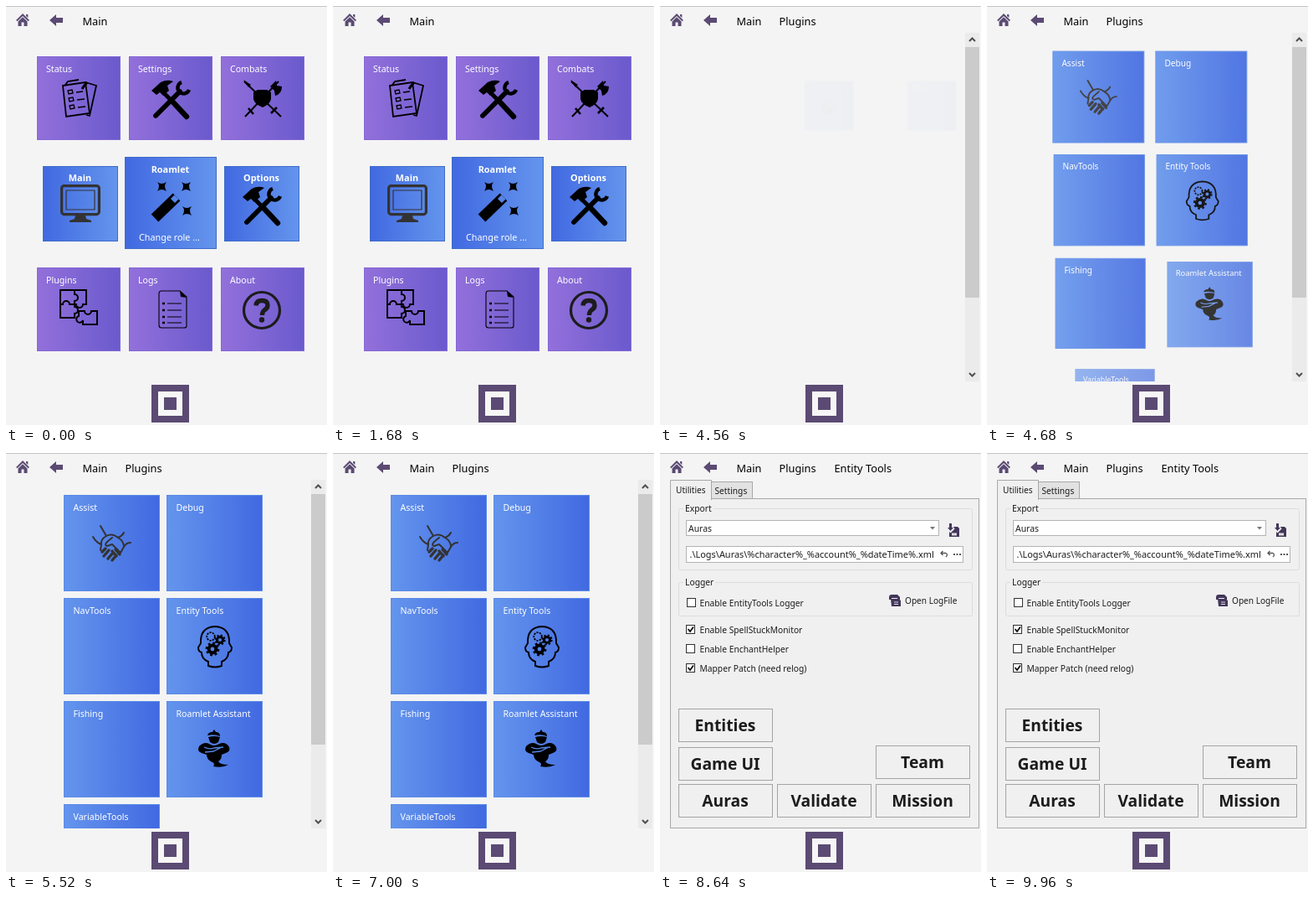
These frames come from a looping animation (384 by 500 pixels, 10 s). An HTML page:

```html
<!DOCTYPE html>
<html lang="en">
<head>
<meta charset="utf-8">
<title>Tile navigation</title>
<style>
  html, body { margin: 0; width: 100%; height: 100%; overflow: hidden; background: #f4f4f4; }
  svg { display: block; width: 384px; height: 500px; font: 10.6px "Noto Sans", "Open Sans", sans-serif; }
  .ink { fill: none; stroke: #000; stroke-width: 2; }
  .ink .fill { fill: #000; stroke: none; }
  .bold { font-weight: 700; }
</style>
</head>
<body>
<svg id="stage" viewBox="0 0 384 500">
  <defs>
    <linearGradient id="purple"><stop stop-color="#9370db"/><stop offset="1" stop-color="#6a5acd"/></linearGradient>
    <linearGradient id="blue"><stop stop-color="#4169e1"/><stop offset="1" stop-color="#6495ed"/></linearGradient>
    <linearGradient id="sky"><stop stop-color="#6495ed"/><stop offset="1" stop-color="#4169e1"/></linearGradient>
    <clipPath id="view"><path d="M0 32H365V448H0z"/></clipPath>

    <g id="status" class="ink" style="stroke-width:1.8">
      <path d="M28 5L41 9L33 45L29 44M4 8L7 4L20 2"/>
      <path d="M1 9L28 5L33 42L5 46z"/>
      <path d="M7 15l5-1 1 4-5 1zM8 24l5-1 1 4-5 1zM9 33l5-1 1 4-5 1z" stroke-width="1.3"/>
      <path d="M17 17l8-1M18 26l9-1M19 35l9-1" stroke-width="1.6"/>
      <path d="M24 13l2-3 4-5" stroke-width="3"/>
    </g>
    <g id="tools" class="ink">
      <path d="M35 14L6 43" stroke-width="5.8" stroke-linecap="round"/>
      <path d="M37 3A7 7 0 1 0 46 12" stroke-width="4.4"/>
      <path d="M16 16L28 28" stroke-width="5"/>
      <path d="M27 27L43 44" stroke-width="6.4" stroke-linecap="round"/>
      <path class="fill" d="M1 13L12 3Q20 -1 27 2L20 7L22 13L15 19L11 15L7 18z"/>
    </g>
    <g id="combat" class="ink">
      <path d="M2 3L46 45M43 3L3 45" stroke-width="2"/>
      <path d="M1 1l9 6-3 3z" class="fill"/>
      <path d="M34 41l7-7M7 35l6 7" stroke-width="2.6"/>
      <path class="fill" d="M33 9L40 2L41 8L47 9Q47 18 39 20L38 14z"/>
      <path class="fill" d="M13 16L18 13H29L34 16V24Q33 30 24 34Q14 30 13 24z"/>
    </g>
    <g id="monitor" class="ink" stroke-linejoin="round">
      <rect x="1.600" y="1.600" width="44.800" height="34" rx="3" style="stroke:#333;stroke-width:3.2"/>
      <rect x="7" y="7" width="34" height="23" style="stroke:#333;stroke-width:1.2"/>
      <path d="M18 37H30L31 41L37 43V45H11V43L17 41z" fill="#333" stroke="none"/>
    </g>
    <g id="wand" class="ink">
      <path d="M6 45L32 20" stroke-width="12.500" stroke-linejoin="round"/>
      <path d="M27.500 24.500L32 20" stroke="#5585e9" stroke-width="7"/>
      <path id="spark" class="fill" d="M9 2Q14 6 20 2Q16 7 20 13Q14 9 9 13Q13 7 9 2z"/>
      <use href="#spark" x="29"/><use href="#spark" x="30" y="29"/>
    </g>
    <g id="puzzle" class="ink" stroke-width="1.8">
      <path d="M1 1H18V6a4 4 0 1 1 0 8V18H12a4 4 0 1 0-8 0H1z"/>
      <path d="M18 1H32V18H28a4 4 0 1 1-8 0H18M1 18V34H18V29a4 4 0 1 0 0-8V18"/>
      <path d="M23 26H30a4 4 0 1 0 8 0H45V42H28V37a4 4 0 1 1-5-5z"/>
    </g>
    <g id="doc" class="ink" style="stroke-width:1.1">
      <path d="M4 1H26L34 8V43Q34 45 31 45H4Q1 45 1 42V4Q1 1 4 1z"/>
      <path class="fill" d="M26 1L34 9L27 8z"/>
      <path d="M11 16H28M11 24H28M11 32H28M11 39H28"/>
      <path d="M5 16H8M5 24H8M5 32H8M5 39H8" stroke-width="2.6"/>
    </g>
    <g id="about" class="ink">
      <circle cx="23" cy="23" r="21.5" style="stroke:#1c1c1c;stroke-width:3.2"/>
      <path d="M16 17.500Q16.500 11.500 23 11.500Q30 11.500 30 17Q30 21 26 23Q23.500 25 23.500 29" style="stroke:#1c1c1c;stroke-width:5.4"/>
      <circle cx="23" cy="34.500" r="3.2" fill="#1c1c1c" stroke="none"/>
    </g>
    <g id="hands" class="ink" style="stroke:#333;stroke-linecap:round;stroke-linejoin:round">
      <path d="M10 1L17 13M1 14Q5 21 11 23M38 9Q36 13 31 15M46 21Q41 21 38 26"/>
      <path d="M17 13Q24 9 31 15Q38 19 38 26L34 33L24 23L18 25Q14 24 18 20L24 15M17 13Q10 17 11 23L10 30"/>
      <path d="M12 32l4-4M14 37l6-7M19 40l6-7M24 42l5-6M28 29l5 6M24 31l5 6" style="stroke-width:3.4"/>
    </g>
    <g id="head" class="ink">
      <path d="M13 48V43Q5 40 5 32Q1 31 1 26L4 21Q3 2 21 1Q39 2 38 21L41 26Q41 31 37 32Q37 40 29 43V48Q21 51 13 48z" style="stroke-width:1.9"/>
      <circle cx="16" cy="13" r="4.8" style="stroke-width:1.8;stroke-dasharray:2.2 1.2"/>
      <circle cx="27" cy="17" r="3.6" style="stroke-width:3"/>
      <circle cx="27" cy="17" r="5.6" style="stroke-width:2;stroke-dasharray:2.2 2.2"/>
      <circle cx="18" cy="28" r="4.4" style="stroke-width:4"/>
      <circle cx="18" cy="28" r="7.2" style="stroke-width:2.4;stroke-dasharray:2.8 2.85"/>
    </g>
    <g id="genie" class="ink">
      <path class="fill" d="M12 7Q13 3 18 3L20 0L22 3Q27 3 27 8Q20 5 12 7z"/>
      <path class="fill" d="M13 9Q20 7 27 9L25 15Q20 19 15 15z"/>
      <path class="fill" d="M2 20Q8 14 14 17Q20 21 26 17Q34 14 38 21Q40 26 34 28L29 30Q29 36 25 38Q27 42 37 42Q30 46 19 44Q22 40 16 38Q11 35 11 30L5 28Q-1 26 2 20z"/>
      <path d="M8 21Q14 24 20 22L31 21M9 27L19 26L29 21" style="stroke:#5586ea;stroke-width:1.3"/>
    </g>
  </defs>

  <path fill="#f4f4f4" d="M0 0H384V500H0z"/>
  <path fill="#c4c4c4" d="M0 0H384V1H0z"/>
  <g fill="#5b4a73">
    <path d="M20 9L28 17L26.5 18.3L20 12L13.5 18.3L12 17zM24 10h2.3v4L24 12z"/>
    <path d="M14.5 18.5L20 13.3L25.5 18.5V24H21.5V19.5H18.5V24H14.5z"/>
    <path d="M52 17L60 10V14H68V20H60V24z"/>
    <path d="M174 452H219V497H174z"/>
    <path fill="#f6f6f6" d="M182 460H211V489H182z"/>
    <path d="M189 467H204V482H189z"/>
  </g>
  <g id="crumbs"></g>
  <g id="main"></g>
  <g id="plugins">
    <path fill="#ebebeb" d="M365 32H382V448H365z"/>
    <path fill="#cbcbcb" d="M365 49H382V348H365z"/>
    <path fill="none" stroke="#505050" stroke-width="2" d="M370 42l3.5-3.5 3.5 3.5M370 438l3.5 3.5 3.5-3.5"/>
    <g id="list" clip-path="url(#view)"></g>
  </g>
  <g id="entity"></g>
</svg>
<script>
const LOOP = 10000, OPEN_PLUGINS = 4240, OPEN_ENTITY = 8300;
const $ = id => document.getElementById(id);

function add(parent, tag, attrs, label) {
  const el = document.createElementNS("http://www.w3.org/2000/svg", tag);
  for (const k in attrs) el.setAttribute(k, attrs[k]);
  if (label) el.textContent = label;
  return parent.appendChild(el);
}
const text = (p, x, y, label, size, fill = "#1c1c1c", more = {}) =>
  add(p, "text", { x, y, "font-size": size, fill, ...more }, label);
const box = (p, x, y, width, height, fill, stroke, rx = 0) =>
  add(p, "rect", { x: x + .5, y: y + .5, width: width - 1, height: height - 1, fill, stroke, rx });
const path = (p, d, attrs) => add(p, "path", { d, ...attrs });

// Tiles are drawn around their own centre so they can be scaled in place.
function tile(parent, x, y, size, fill, edge, title, icon, ix, iy, titleX = 11.5) {
  const g = add(parent, "g"), h = size / 2;
  box(g, -h, -h, size, size, `url(#${fill})`, edge);
  const caption = title && text(g, titleX - h, 19 - h, title, 10.6, "#fff");
  if (icon) add(g, "use", { href: "#" + icon, x: ix - x - h, y: iy - y - h });
  const t = { g, caption, cx: x + h, cy: y + h };
  place(t);
  return t;
}
function place(t, scale = 1, dx = 0, dy = 0, opacity = 1) {
  t.g.setAttribute("transform", `translate(${t.cx + dx} ${t.cy + dy}) scale(${scale})`);
  t.g.setAttribute("opacity", opacity);
}

const crumbs = [["Main", 91.5], ["Plugins", 142.5], ["Entity Tools", 208.5]]
  .map(([s, x]) => text($("crumbs"), x, 22.5, s, 12.8, "#000"));

// Main page
const main = $("main");
const menu = [
  ["Status", 37, 60, "status", 67, 86], ["Settings", 147, 60, "tools", 173, 88],
  ["Combats", 257, 60, "combat", 283, 87], ["Plugins", 37, 312, "puzzle", 64, 338],
  ["Logs", 147, 312, "doc", 182, 339], ["About", 257, 312, "about", 283, 340]
].map(([s, x, y, icon, ix, iy]) => tile(main, x, y, 100, "purple", "#8468d6", s, icon, ix, iy, 11));
tile(main, 44, 191, 90, "blue", "#3f6cc8", "", "monitor", 65, 213);
tile(main, 142, 180, 110, "blue", "#3f6cc8", "", "wand", 172, 208);
tile(main, 261, 191, 90, "blue", "#3f6cc8", "", "tools", 282, 215);
const mid = { "text-anchor": "middle" }, midBold = { ...mid, class: "bold" };
text(main, 88.5, 209, "Main", 10.9, "#fff", midBold);
text(main, 196.5, 199, "Roamlet", 10.9, "#fff", midBold);
text(main, 305.5, 209, "Options", 10.9, "#fff", midBold);
text(main, 195.5, 280, "Change role ...", 10.8, "#fff", mid);

// Plugins page: title, column, row, entry time, icon
const list = [
  ["Assist", 0, 0, 4559, "hands", 103, 86], ["Debug", 1, 0, 4559],
  ["NavTools", 0, 1, 4563], ["Entity Tools", 1, 1, 4563, "head", 229, 206],
  ["Fishing", 0, 2, 4569], ["Roamlet Assistant", 1, 2, 4594, "genie", 229, 330],
  ["VariableTools", 0, 3, 4615]
].map(([s, c, r, start, icon, ix, iy]) => Object.assign(
  tile($("list"), 69 + 123 * c, 50 + 123 * r, 115, "sky", "#5b8ae6", s, icon, ix, iy), { start }));

// Entity Tools page
const page = $("entity"), line = "#dcdcdc", purple = "#43365a", face = "#f0f0f0";
box(page, 12, 54, 370, 394, face, "#a8a8a8");
box(page, 61, 34, 50, 21, "#e2e2e2", "#a8a8a8");
path(page, "M12.5 56V32.5H61.5V56", { fill: face, stroke: "#a8a8a8" });
text(page, 19, 48, "Utilities", 10.1);
text(page, 65.5, 49, "Settings", 10.2);
for (const [y, h, label, gap] of [[66, 74, "Export", 36], [154, 41, "Logger", 38]]) {
  box(page, 22, y, 352, h, "none", line, 2);
  box(page, 28, y - 2, gap, 5, face, face);
  text(page, 30, y + 4, label, 10.3);
}
box(page, 31, 80, 303, 19, "#fff", "#b4b4b4");
text(page, 34, 93.5, "Auras", 10.4);
path(page, "M323 88h6l-3 3.5z", { fill: "#777" });
box(page, 31, 111, 332, 20, "#fff", "#b4b4b4");
text(page, 35.5, 125, ".\\Logs\\Auras\\%character%_%account%_%dateTime%.xml", 10.95);
path(page, "M336 119.5H342Q345 121 342 124M338.5 117l-2.5 2.5 2.5 2.5", { fill: "none", stroke: "#555", "stroke-width": 1.3 });
path(page, "M351 120h2v2h-2zM354.5 120h2v2h-2zM358 120h2v2h-2z", { fill: "#555" });
path(page, "M346 84h3v5h2l-3.5 4-3.5-4h2zM351 88h5l2 2v10h-12v-6l1.500 1.500 5-5z", { fill: purple });
path(page, "M349 95.500h6v3h-6z", { fill: "#ddd" });
path(page, "M274 172q0-3 3-3h7l3 3v3h-3v-2h-7v2h-3zM276 174h9l3 2v7h-11z", { fill: purple });
path(page, "M280 178h5M280 180.5h5", { stroke: "#ddd" });
text(page, 293, 180, "Open LogFile", 10.1);

for (const [x, y, on, label] of [
  [32, 173, 0, "Enable EntityTools Logger"], [31, 205, 1, "Enable SpellStuckMonitor"],
  [31, 228, 0, "Enable EnchantHelper"], [31, 251, 1, "Mapper Patch (need relog)"]
]) {
  box(page, x, y, 11, 11, "#fff", "#333");
  if (on) path(page, `M${x + 2.5} ${y + 5}l2.500 3 4-5.500`, { fill: "none", stroke: "#111", "stroke-width": 1.8 });
  text(page, 47.5, y + 9.7, label, 10.25);
}
for (const [x, y, label] of [
  [22, 305, "Entities"], [22, 351, "Game UI"], [22, 395, "Auras"],
  [140, 395, "Validate"], [258, 349, "Team"], [258, 395, "Mission"]
]) {
  box(page, x, y, 113, 40, face, "#a4a4a4");
  text(page, x + 56, y + 27, label, 19.3, "#1c1c1c", midBold);
}

const clamp = v => Math.min(1, Math.max(0, v));
const easeOut = v => 1 - (1 - clamp(v)) ** 3;
const show = (el, on) => el.style.display = on ? "" : "none";

function press(t, p) {
  place(t, 1 - .035 * p);
  t.caption.setAttribute("opacity", 1 - .2 * p);
}

function render(t) {
  const inPlugins = t >= OPEN_PLUGINS, inEntity = t >= OPEN_ENTITY;
  show(main, !inPlugins);
  show($("plugins"), inPlugins && !inEntity);
  show(page, inEntity);
  show(crumbs[1], inPlugins);
  show(crumbs[2], inEntity);

  press(menu[3], clamp((t - 4110) / 50));
  for (const item of list) {
    const p = easeOut((t - item.start) / 220), rest = 1 - p;
    place(item, 1 - .5 * rest, 77.5 * rest, 12 * rest, p);
  }
  if (t > 8000) press(list[3], clamp((t - 8170) / 50));
  else list[3].caption.setAttribute("opacity", 1);
}

const began = performance.now();
function tick() {
  render((performance.now() - began) % LOOP);
  requestAnimationFrame(tick);
}
tick();
</script>
</body>
</html>
```
